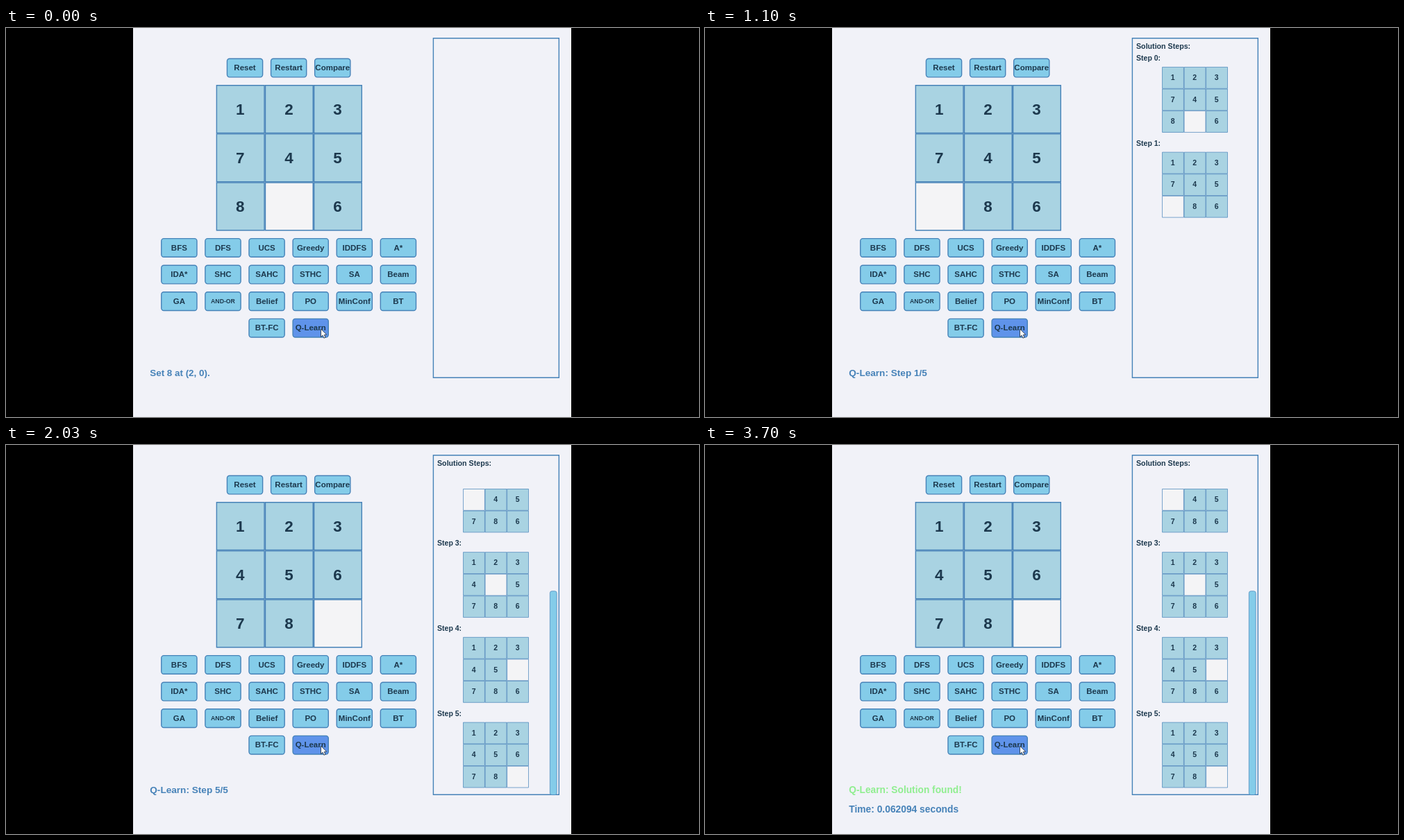
Animation, 998 px wide and 561 px high, one loop 3900 ms. Source, as an HTML page with a canvas:

```html
<!DOCTYPE html>
<html lang="en">
<head>
<meta charset="utf-8">
<title>Sliding puzzle solver</title>
<style>
  html, body { margin: 0; width: 100%; height: 100%; overflow: hidden; background: #000; }
  canvas { display: block; }
</style>
</head>
<body>
<canvas id="stage" width="998" height="561"></canvas>
<script>
const ctx = document.getElementById("stage").getContext("2d");

const LOOP = 3900, FIRST_STEP = 530, STEP_TIME = 300;
const BOARDS = ["123745806", "123745086", "123045786", "123405786", "123450786", "123456780"];
const LAST = BOARDS.length - 1;
const BUTTON_ROWS = [
  ["BFS", "DFS", "UCS", "Greedy", "IDDFS", "A*"],
  ["IDA*", "SHC", "SAHC", "STHC", "SA", "Beam"],
  ["GA", "AND-OR", "Belief", "PO", "MinConf", "BT"],
  ["", "", "BT-FC", "Q-Learn"]
];
const PAPER = "#f1f2f8", BLANK = "#f4f4f6", TILE = "#a9d3e2", SKY = "#84cce9",
      HOVER = "#5f93ea", LINE = "#4682b8", INK = "#1c384d", GREEN = "#90ee90";

// Window units: the app window is 900 x 800, scaled to the stage height.
const SCALE = 561 / 800, WINDOW_X = (998 - 900 * SCALE) / 2;
const PANEL = { x: 615, y: 20, w: 260, h: 700 };
const VIEW_TOP = 90, VIEW_H = 630, ENTRY_H = 175;

function text(str, x, midY, size, color = INK, align = "left") {
  ctx.font = `bold ${size}px "Liberation Sans", Arial, sans-serif`;
  ctx.textAlign = align;
  ctx.fillStyle = color;
  ctx.fillText(str, x, midY + size * 0.355);
}

function box(x, y, w, h, fill, border, radius = 0) {
  ctx.beginPath();
  ctx.roundRect(x + border / 2, y + border / 2, w - border, h - border, radius);
  ctx.fillStyle = fill;
  ctx.fill();
  ctx.strokeStyle = LINE;
  ctx.lineWidth = border;
  ctx.stroke();
}

function button(label, centerX, y) {
  box(centerX - 37.5, y, 75, 40, label === "Q-Learn" ? HOVER : SKY, 2, 5);
  text(label, centerX, y + 19.5, label === "AND-OR" ? 12.4 : 16.4, INK, "center");
}

function board(cells, x, y, size, border, fontSize) {
  [...cells].forEach((digit, i) => {
    const left = x + (i % 3) * size, top = y + Math.floor(i / 3) * size;
    const empty = digit === "0";
    box(left, top, size, size, empty ? BLANK : TILE, border);
    if (!empty) text(digit, left + size / 2 - 0.5, top + size / 2 - 0.7, fontSize, INK, "center");
  });
}

function history(step) {
  const contentH = (step + 1) * ENTRY_H;
  const scroll = Math.max(0, contentH - 665);
  text("Solution Steps:", 624, 37, 15.2);
  ctx.save();
  ctx.beginPath();
  ctx.rect(PANEL.x, scroll ? VIEW_TOP : PANEL.y, PANEL.w, PANEL.h);
  ctx.clip();
  for (let i = 0; i <= step; i++) {
    const y = 80 + i * ENTRY_H - scroll;
    text(`Step ${i}:`, 624, y - 18, 15);
    board(BOARDS[i], 677, y, 45, 1, 15);
  }
  ctx.restore();
  if (scroll) {
    const thumbH = VIEW_H * PANEL.h / contentH;
    box(855, VIEW_TOP + VIEW_H - thumbH, 15, thumbH, SKY, 1, 4);
  }
}

function cursor(x, y) {
  ctx.beginPath();
  [[0, 0], [0, 11.5], [2.6, 9.2], [4.4, 13.2], [6.5, 12.3], [4.8, 8.4], [8.2, 8.2]]
    .forEach(([dx, dy]) => ctx.lineTo(x + dx, y + dy));
  ctx.closePath();
  ctx.fillStyle = "#fff";
  ctx.fill();
  ctx.strokeStyle = "#283848";
  ctx.lineWidth = 0.9;
  ctx.stroke();
}

function draw(time) {
  const tick = Math.floor((time - FIRST_STEP) / STEP_TIME);
  const step = Math.min(tick, LAST);

  ctx.setTransform(1, 0, 0, 1, 0, 0);
  ctx.fillStyle = "#000";
  ctx.fillRect(0, 0, 998, 561);
  ctx.fillStyle = PAPER;
  ctx.fillRect(183, 0, 631, 561);

  ctx.setTransform(SCALE, 0, 0, SCALE, WINDOW_X, 0);
  ["Reset", "Restart", "Compare"].forEach((label, i) => button(label, 229 + 90 * i, 62));
  BUTTON_ROWS.forEach((row, r) => row.forEach((label, c) => {
    if (label) button(label, 94 + 90 * c, 432 + 55 * r);
  }));
  board(BOARDS[Math.max(step, 0)], 170, 117, 100, 2, 32);

  box(PANEL.x, PANEL.y, PANEL.w, PANEL.h, PAPER, 2);
  if (step >= 0) history(step);

  if (step < 0) {
    text("Set 8 at (2, 0).", 34, 709, 19.1, LINE);
  } else if (tick <= LAST) {
    text(`Q-Learn: Step ${step}/${LAST}`, 34, 709, 19.4, LINE);
  } else {
    text("Q-Learn: Solution found!", 34, 709, 19.6, GREEN);
    text("Time: 0.062094 seconds", 34, 749, 19.7, LINE);
  }

  ctx.setTransform(1, 0, 0, 1, 0, 0);
  cursor(453.5, 434);
}

function frame() {
  draw(performance.now() % LOOP);
  requestAnimationFrame(frame);
}
frame();
</script>
</body>
</html>
```
